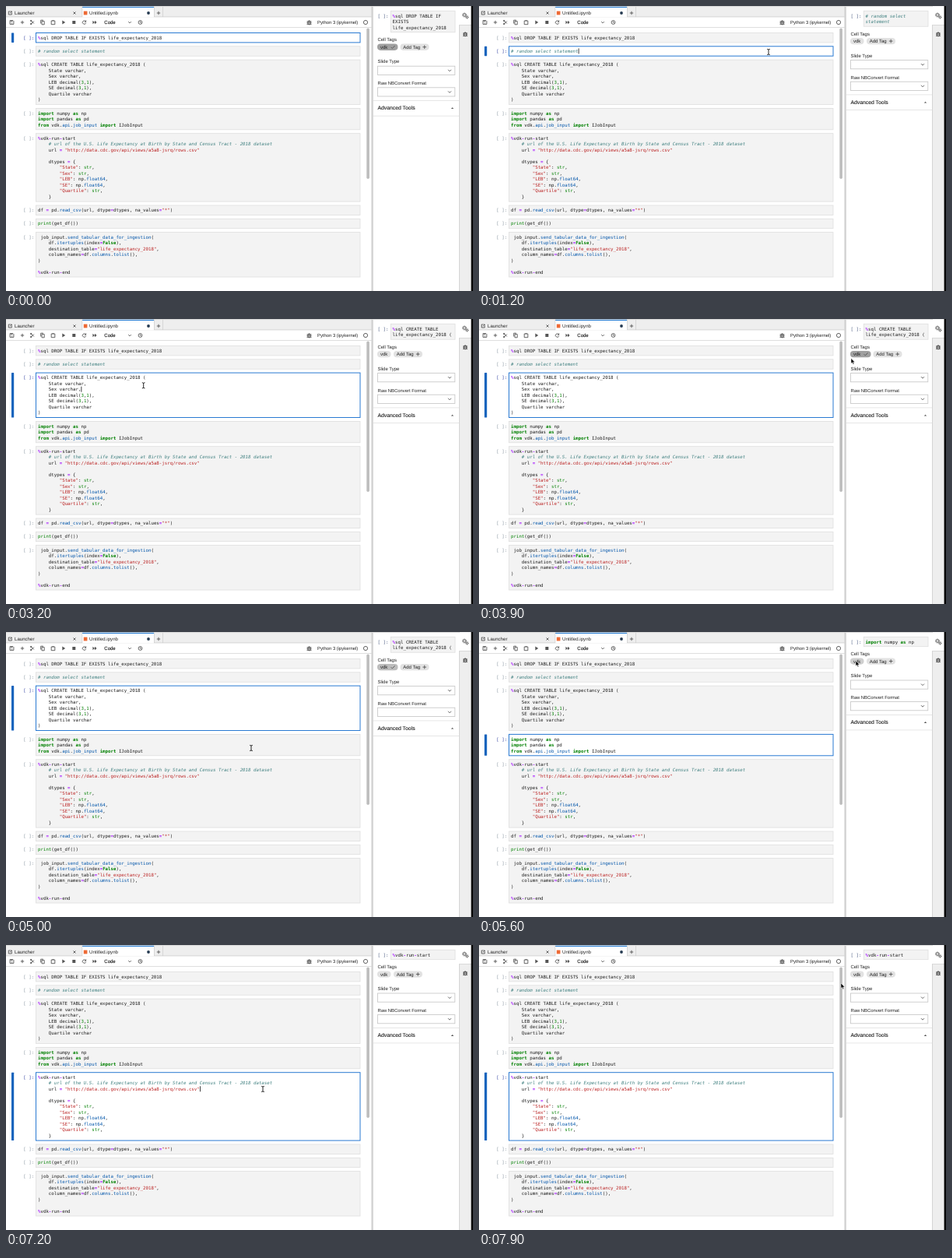
An HTML page that plays this animation: 600x366 px, repeating every 8 s.

```html
<!DOCTYPE html>
<html lang="en">
<head>
<meta charset="utf-8">
<title>Notebook cell tags</title>
<style>
  html, body { margin: 0; width: 100%; height: 100%; overflow: hidden; background: #fff; }
  svg { display: block; width: 600px; height: 366px; }
  text { white-space: pre; text-rendering: geometricPrecision; font: 6px "Liberation Sans", Arial, sans-serif; fill: #222; }
  text.code { font: 5.76px "DejaVu Sans Mono", monospace; fill: #1c1c1c; }
  .comment { fill: #408080; font-style: italic; }
  .string { fill: #ba2121; }
  .keyword { fill: #008000; font-weight: bold; }
  .builtin, .number { fill: #008000; }
  .property { fill: #0055aa; }
  .operator { fill: #a2f; font-weight: bold; }
  .icon { fill: none; stroke: #555; stroke-width: .9; }
  .solid { fill: #555; }
</style>
</head>
<body>
<svg id="stage" viewBox="0 0 600 366" xmlns="http://www.w3.org/2000/svg">
  <g id="chrome"></g>
  <g id="cells"></g>
  <g id="sidebar"></g>
  <rect id="caret" width=".8" height="7" fill="#111"/>
  <path id="beam" d="M-1.8-3.6Q0-3.6 0-2.6Q0-3.6 1.8-3.6M0-2.8V2.8M-1.8 3.6Q0 3.6 0 2.6Q0 3.6 1.8 3.6" fill="none" stroke="#111" stroke-width=".9"/>
  <path id="arrow" d="M0 0V6.7L1.6 5.3L2.7 7.8L3.9 7.3L2.8 4.9H4.9Z" fill="#000" stroke="#fff" stroke-width=".5"/>
</svg>
<script>
const LOOP = 8000, STEP = 100, BLINK = 500;
const CHAR = 3.467, LINE = 7.5;
const byId = id => document.getElementById(id);

const sources = [
`%sql DROP TABLE IF EXISTS life_expectancy_2018`,
`# random select statement`,
`%sql CREATE TABLE life_expectancy_2018 (
    State varchar,
    Sex varchar,
    LEB decimal(3,1),
    SE decimal(3,1),
    Quartile varchar
)`,
`import numpy as np
import pandas as pd
from vdk.api.job_input import IJobInput`,
`%vdk-run-start
    # url of the U.S. Life Expectancy at Birth by State and Census Tract - 2018 dataset
    url = "http://data.cdc.gov/api/views/a5a8-jsrq/rows.csv"

    dtypes = {
        "State": str,
        "Sex": str,
        "LEB": np.float64,
        "SE": np.float64,
        "Quartile": str,
    }`,
`df = pd.read_csv(url, dtype=dtypes, na_values="*")`,
`print(get_df())`,
` job_input.send_tabular_data_for_ingestion(
    df.itertuples(index=False),
    destination_table="life_expectancy_2018",
    column_names=df.columns.tolist(),
)

%vdk-run-end`];

let top_ = 34.5;
const cells = sources.map(source => {
  const lines = source.split("\n");
  const cell = { lines, y: top_, h: 12.4 + (lines.length - 1) * LINE };
  top_ += cell.h + 4.9;
  return cell;
});

// Which cell is active, where its caret sits, and when its tag is applied
const selections = [
  { at: 0, cell: 0, tagged: 0 },
  { at: 1100, cell: 1, line: 0, tagged: Infinity },
  { at: 3100, cell: 2, line: 2, tagged: 3800 },
  { at: 5050, cell: 3, line: 2, tagged: 5700 },
  { at: 7100, cell: 4, line: 2, tagged: Infinity }
];

// Pointer stops: time, x, y
const stops = [
  [0, 486, 51], [300, 484, 51], [1000, 372, 59], [1300, 372, 59], [1900, 514, 47],
  [2100, 505, 47], [2700, 141, 88], [3100, 141, 90], [3600, 484, 45], [3800, 484, 46],
  [3900, 478, 50.5], [4200, 430, 90], [5000, 315, 149], [5200, 315, 149], [5600, 484, 37],
  [5900, 484, 38], [6600, 432, 90], [7100, 330, 185], [7300, 330, 185], [7900, 465, 49]
];

const rect = (x, y, w, h, fill, extra = "") =>
  `<rect x="${x}" y="${y}" width="${w}" height="${h}" fill="${fill}" ${extra}/>`;
const label = (x, y, text, size = 6, extra = "") =>
  `<text x="${x}" y="${y}" style="font-size:${size}px" ${extra}>${text}</text>`;
const icon = (x, y, d, cls = "icon") =>
  `<path class="${cls}" transform="translate(${x} ${y})" d="${d}"/>`;

const tokenRule = new RegExp([
  "(?<comment>#.*)", "(?<string>\"[^\"]*\")",
  "(?<keyword>\\b(?:import|from|as|False)\\b)", "(?<builtin>\\b(?:str|print)\\b)",
  "(?<property>(?<=\\w\\.)[a-z_]\\w*)", "(?<word>[A-Za-z_]\\w*)",
  "(?<number>\\d+)", "(?<operator>[%=*-])"
].join("|"), "g");

function highlight(line) {
  return line.replace(tokenRule, (token, ...rest) => {
    const kind = Object.entries(rest.at(-1)).find(([, value]) => value !== undefined)[0];
    return kind === "word" ? token : `<tspan class="${kind}">${token}</tspan>`;
  });
}

function codeLine(x, y, line, comment = false) {
  const indent = line.length - line.trimStart().length;
  const body = comment ? `<tspan class="comment">${line}</tspan>` : highlight(line.trimStart());
  return `<text class="code" x="${x + indent * CHAR}" y="${y}">${body}</text>`;
}

function wrap(text, width) {
  return text.split(" ").reduce((rows, word) => {
    const last = rows[rows.length - 1];
    if (last && (last + " " + word).length <= width) rows[rows.length - 1] += " " + word;
    else rows.push(word);
    return rows;
  }, []);
}

const bug = "M-1.5-1.5H1.5V2Q0 4-1.5 2ZM-1-1.6Q0-3.2 1-1.6M-3-1H3M-3 .7H3M-3 2.4H3";

function drawChrome() {
  const gear = (x, y, r) => `<circle class="icon" cx="${x}" cy="${y}" r="${r}"/>` +
    `<circle class="icon" cx="${x}" cy="${y}" r="${r + .8}" stroke-dasharray="1 1"/>`;
  byId("chrome").innerHTML =
    rect(0, 0, 470, 14, "#eee") + rect(0, 0, 470, 1, "#d5d5d5") +
    rect(0, 13.6, 470, .7, "#c8c8c8") +
    rect(98, 1, 92, 13.4, "#fff") + rect(98, 1, 92, 1, "#1976d2") +
    rect(97.6, 1, .6, 13, "#c8c8c8") + rect(190, 1, .6, 13, "#c8c8c8") + rect(201, 1, .6, 13, "#c8c8c8") +
    icon(5.3, 9, "M0-2H-2V2H2V0M.4-2H2V-.4M2-2L-.4 .4") +
    label(11, 11.2, "Launcher", 6.1) + icon(88, 9, "M-1.5-1.5L1.5 1.5M-1.5 1.5L1.5-1.5") +
    rect(99.8, 6.6, 4.6, 4.8, "#ee6a35") +
    label(107, 11.2, "Untitled.ipynb", 6.1) +
    `<circle cx="183" cy="9" r="1.9" fill="#263b52"/>` +
    icon(196, 9, "M-2.2 0H2.2M0-2.2V2.2") +
    icon(7.5, 21, "M-2.4-2.4H1.5L2.4-1.5V2.4H-2.4ZM-1.5-1.3H1M-.6 1H.6") +
    icon(21, 21, "M-2.2 0H2.2M0-2.2V2.2") +
    icon(34, 21, "M-2-2.4L1.8 1.5M-2 2.4L1.8-1.5M-2.4-2.6h1.2v1.2h-1.2ZM-2.4 1.4h1.2v1.2h-1.2Z") +
    icon(47, 21, "M-1-1.4H2.2V2.8H-1ZM-2.3 1.5V-2.8H1") +
    icon(60.5, 21, "M-2.3-2H2.3V2.7H-2.3ZM-1-2.3H1") +
    icon(74, 21, "M-1.7-2.4L2.2 0L-1.7 2.4Z", "solid") +
    icon(87.3, 21, "M-2-2H2V2H-2Z", "solid") +
    icon(100.5, 21, "M1.8-1.3A2.2 2.2 0 1 0 2.2 .7M2.2-2.6V-.7H.3") +
    icon(114, 21, "M-2.6-2.2L0 0L-2.6 2.2ZM0-2.2L2.6 0L0 2.2Z", "solid") +
    label(126.3, 23.2, "Code", 6, 'stroke="#222" stroke-width=".15"') +
    icon(159, 21, "M-1.8-.9L0 .9L1.8-.9") +
    icon(172.5, 21, "M-2.4 0A2.4 2.4 0 1 1 2.4 0A2.4 2.4 0 1 1-2.4 0M0-1.5V.2L1.2 .8") +
    icon(389.5, 21, bug) + label(400, 23.2, "Python 3 (ipykernel)", 5.88) +
    `<circle class="icon" cx="462" cy="21" r="2.6"/>` +
    rect(0, 27, 470, .7, "#d0d0d0") +
    rect(463.3, 28.5, 3.6, 193.5, "#bdbdbd", 'rx="1.8"') +
    rect(469.4, 0, 2.4, 366, "#d2d2d2") +
    rect(471.8, 0, 126, 1, "#d5d5d5") +
    rect(582.5, 0, 15.5, 366, "#eee") + rect(582, 0, .7, 366, "#c8c8c8") +
    rect(582, 1, 16, 23.5, "#fff") + rect(582, 24.3, 16, .6, "#c8c8c8") +
    rect(597.6, 0, 2.4, 366, "#000") +
    gear(589, 11.5, 1.7) + gear(592.4, 14.4, 1) + icon(590, 36, bug);
}

function drawCells(active) {
  byId("cells").innerHTML = cells.map(({ lines, y, h }, i) => {
    const on = i === active;
    return (on ? rect(7, y, 3.2, h, "#1564bd", 'rx=".6"') : "") +
      rect(38.5, y, 416.5, h, on ? "#fff" : "#f3f3f3",
        `stroke="${on ? "#2979d2" : "#dedede"}" stroke-width="${on ? 1 : .8}"`) +
      `<text class="code" x="22.3" y="${y + 8.1}" style="fill:${on ? "#303f9f" : "#8995a1"}">[ ]:</text>` +
      lines.map((line, n) => codeLine(41, y + 8.1 + n * LINE, line)).join("");
  }).join("");
}

function previewRows(active) {
  return wrap(cells[active].lines[0], 22);
}

function drawSidebar(active, tagged, hover) {
  const rows = previewRows(active);
  const shift = (rows.length - 1) * 7.6;
  const comment = rows[0].startsWith("#");
  const chip = (x, w, fill) => rect(x, 33.4, w, 8.3, fill, 'rx="4.1"');
  const select = y => rect(477.4, y, 99.4, 11.2, "#fff", 'stroke="#c4c4c4" stroke-width=".8"') +
    icon(570, y + 5.6, "M-2-1L0 1L2-1");
  const addX = tagged ? 506.5 : 498;
  const vdkFill = tagged ? (hover ? "#a0a0a0" : "#bdbdbd") : (hover ? "#cfcfcf" : "#e2e2e2");
  byId("sidebar").innerHTML =
    `<text class="code" x="477.5" y="14.6" style="fill:#4b5a80">[ ]:</text>` +
    rect(494.3, 6.3, 82.7, 12.4 + (rows.length - 1) * LINE, "#f3f3f3", 'stroke="#dedede" stroke-width=".8"') +
    rows.map((row, n) => codeLine(496.6, 14.6 + n * LINE, row, comment)).join("") +
    `<g transform="translate(0 ${shift})">` +
    label(477.4, 30, "Cell Tags") +
    chip(477, tagged ? 26.5 : 17.5, vdkFill) + label(481, 39.7, "vdk") +
    (tagged ? icon(497, 37.6, "M-2.4 0L-.7 1.7L2.6-1.8") : "") +
    chip(addX, 37, "#e2e2e2") + label(addX + 3.7, 39.7, "Add Tag") +
    icon(addX + 31.2, 37.5, "M-2.3 0H2.3M0-2.3V2.3") +
    label(477.4, 58.3, "Slide Type") + select(62) +
    label(477.4, 86, "Raw NBConvert Format", 5.9) + select(89.6) +
    rect(472, 106, 110, .7, "#dcdcdc") +
    label(477.4, 118.3, "Advanced Tools", 6.85, 'stroke="#222" stroke-width=".12"') +
    icon(573.5, 116, "M-1.7 .9L0-.9L1.7 .9Z", "solid") +
    rect(472, 125.6, 110, .7, "#dcdcdc") + `</g>`;
}

function pointerAt(t) {
  const next = stops.findIndex(stop => stop[0] > t);
  if (next < 0) return stops.at(-1).slice(1);
  const [t0, x0, y0] = stops[next - 1], [t1, x1, y1] = stops[next];
  const u = (t - t0) / (t1 - t0), k = u * u * (3 - 2 * u);
  return [x0 + (x1 - x0) * k, y0 + (y1 - y0) * k];
}

let drawnCell = -1, drawnSide = "";

function render(time) {
  const t = Math.floor(time % LOOP / STEP) * STEP;
  const { at, cell: active, line, tagged } = selections.findLast(s => s.at <= t);
  const [x, y] = pointerAt(t);

  if (active !== drawnCell) drawCells(drawnCell = active);
  const chipY = 37.5 + (previewRows(active).length - 1) * 7.6;
  const isTagged = t >= tagged;
  const hover = x > 477 && x < (isTagged ? 503 : 494) && Math.abs(y - chipY) < 6.5;
  const side = [active, isTagged, hover].join();
  if (side !== drawnSide) {
    drawSidebar(active, isTagged, hover);
    drawnSide = side;
  }

  const showCaret = line !== undefined && Math.floor((t - at) / BLINK) % 2 === 0;
  const caret = byId("caret");
  caret.style.display = showCaret ? "" : "none";
  if (showCaret) {
    caret.setAttribute("x", 41 + cells[active].lines[line].length * CHAR);
    caret.setAttribute("y", cells[active].y + 2.6 + line * LINE);
  }

  const overCode = x > 38 && x < 455 && cells.some(c => y >= c.y && y <= c.y + c.h);
  for (const [id, shown] of [["beam", overCode], ["arrow", !overCode]]) {
    byId(id).style.display = shown && t > 0 ? "" : "none";
    byId(id).setAttribute("transform", `translate(${x} ${y})`);
  }
}

drawChrome();
const start = performance.now();
function tick() {
  render(performance.now() - start);
  requestAnimationFrame(tick);
}
tick();
</script>
</body>
</html>
```
